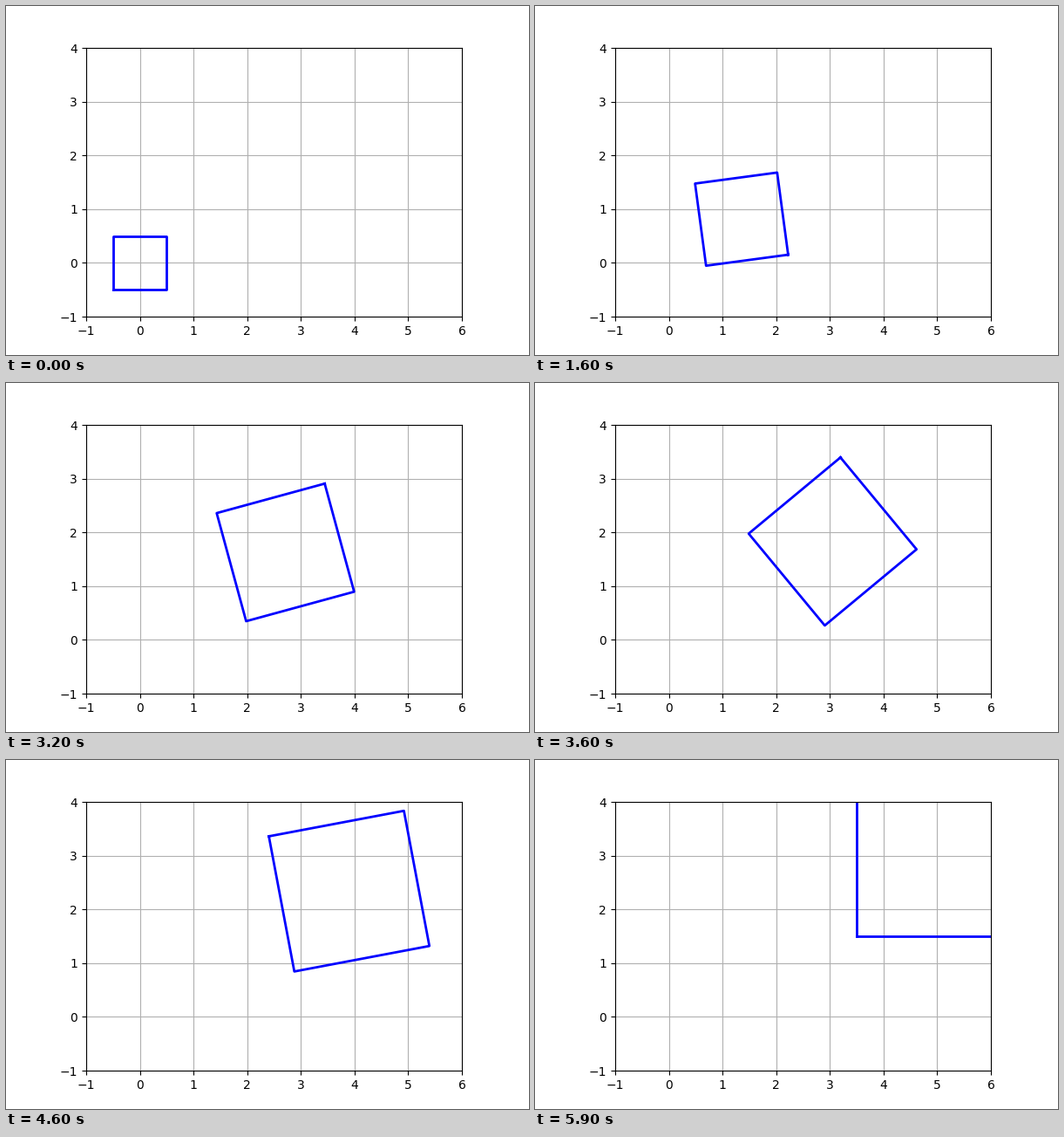
Write a matplotlib script that moves like this. It is 600 by 400 pixels and loops after 6 s.

```python
import numpy as np
import matplotlib.pyplot as plt
from matplotlib.animation import FuncAnimation

FRAMES = 60
INTERVAL = 100  # ms

# Corner directions, counter-clockwise from bottom left and back again
CORNERS = np.pi * (5 / 4 + np.arange(5) / 2)

fig, ax = plt.subplots(figsize=(6, 4), dpi=100)
ax.set_xlim(-1, 6)
ax.set_ylim(-1, 4)
ax.set_aspect("equal")
ax.grid(True)
line, = ax.plot([], [], "b-", lw=2)


def pose(t):
    """Square outline at progress t: one full turn, growing from side 1 to 3."""
    radius = (1 + 2 * t) / np.sqrt(2)
    angles = CORNERS + 2 * np.pi * t
    return 5 * t + radius * np.cos(angles), 3 * t + radius * np.sin(angles)


def update(i):
    line.set_data(*pose(i / (FRAMES - 1)))
    return line,


anim = FuncAnimation(fig, update, frames=FRAMES, interval=INTERVAL,
                     repeat=True, repeat_delay=0)
plt.show()
```
